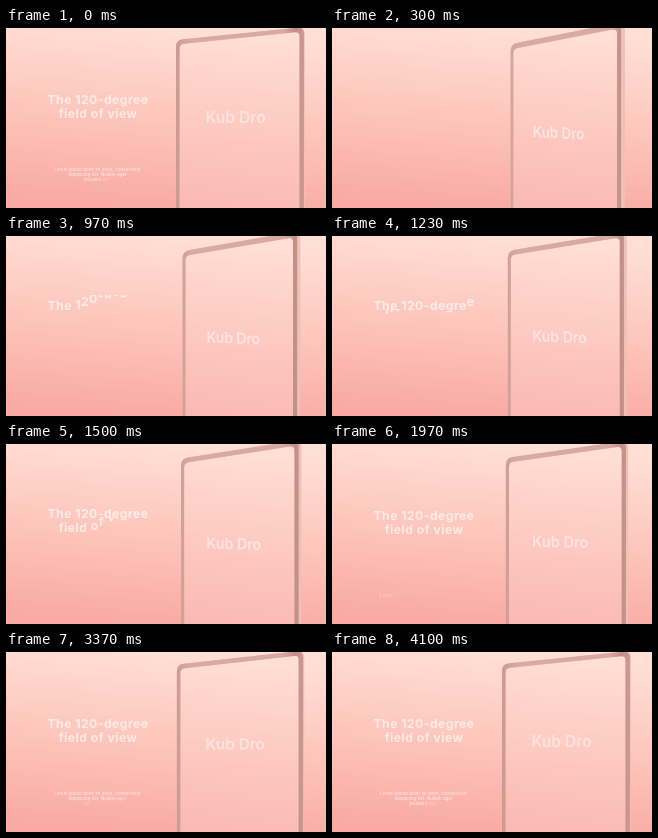
An HTML page that plays this animation: 320x180 px, repeating every 4.13 s.

```html
<!DOCTYPE html>
<html lang="en">
<head>
<meta charset="utf-8">
<title>Tablet turn</title>
<style>
  html, body { margin: 0; width: 100%; height: 100%; overflow: hidden; background: #fcc5bb; }
  svg { display: block; width: 100%; height: 100%; }
  text { font-family: Inter, "Open Sans", sans-serif; fill: #fff; text-anchor: middle; }
  #head text { font-size: 12.2px; font-weight: 700; letter-spacing: .45px; }
  #para text { font-size: 4.55px; font-weight: 400; }
  #name { font-size: 15.6px; font-weight: 600; }
</style>
</head>
<body>
<svg viewBox="0 0 320 180" preserveAspectRatio="none">
  <defs>
    <linearGradient id="sky" gradientUnits="userSpaceOnUse" x1="168" y1="0" x2="152" y2="180">
      <stop offset="0" stop-color="#ffdfd5"/>
      <stop offset=".5" stop-color="#fdc6bc"/>
      <stop offset="1" stop-color="#f9aaa4"/>
    </linearGradient>
    <linearGradient id="metal" gradientUnits="userSpaceOnUse" x1="170" y1="0" x2="298" y2="0">
      <stop offset="0" stop-color="#cc9a92"/>
      <stop offset=".12" stop-color="#d8aaa1"/>
      <stop offset=".84" stop-color="#d8a9a0"/>
      <stop offset=".93" stop-color="#c28f87"/>
      <stop offset="1" stop-color="#cc9a92"/>
    </linearGradient>
    <linearGradient id="glow" gradientUnits="userSpaceOnUse" x1="0" y1="20" x2="0" y2="180">
      <stop offset="0" stop-color="#fff" stop-opacity="0"/>
      <stop offset="1" stop-color="#fff" stop-opacity=".17"/>
    </linearGradient>
    <clipPath id="row0"><rect x="30" y="61" width="130" height="20"/></clipPath>
    <clipPath id="row1"><rect x="30" y="75" width="130" height="20"/></clipPath>
  </defs>
  <rect width="320" height="180" fill="url(#sky)"/>
  <path id="screen" fill="url(#glow)"/>
  <path id="side" fill="#eec1b7" fill-rule="evenodd"/>
  <path id="frame" fill="url(#metal)" fill-rule="evenodd"/>
  <text id="name">Kub Dro</text>
  <g id="head" opacity=".64">
    <g clip-path="url(#row0)"><text x="92" y="76">The 120-degree</text></g>
    <g clip-path="url(#row1)"><text x="92" y="90">field of view</text></g>
  </g>
  <g id="para" opacity=".75"></g>
</svg>
<script>
const LOOP = 4130, TURN = 4100;
const $ = id => document.getElementById(id);
const clamp = v => Math.min(1, Math.max(0, v));
const inOut = p => p < .5 ? 4 * p ** 3 : 1 - 4 * (1 - p) ** 3;

const headRows = [...document.querySelectorAll('#head text')];
const paraLines = ['Lorem ipsum dolor sit amet, consectetur', 'adipiscing elit. Nullam eget', 'posuere orci'];
const letters = [];

paraLines.forEach((line, row) => {
  const text = document.createElementNS('http://www.w3.org/2000/svg', 'text');
  text.setAttribute('x', 91.5);
  text.setAttribute('y', 142.5 + row * 5);
  for (const ch of line) {
    const span = document.createElementNS('http://www.w3.org/2000/svg', 'tspan');
    span.textContent = ch;
    text.append(span);
    letters.push(span);
  }
  $('para').append(text);
});

// Outline with rounded top corners, running off the bottom edge
function panel(x0, y0, x1, y1, r) {
  const k = (y1 - y0) / (x1 - x0);
  return `M${x0} 190V${y0 + r}Q${x0} ${y0} ${x0 + r} ${y0 + k * r}` +
    `L${x1 - r} ${y1 - k * r}Q${x1} ${y1} ${x1} ${y1 + r}V190Z`;
}

function drawTablet(t) {
  const u = clamp(1 - t / TURN), e = u ** 1.4;
  const left = 170 + 9.6 * e, right = 298 - 10 * e;
  const edge = right + .8 + 3.5 * e;
  const yl = 12 + 4.7 * e, yr = -1 - 5.6 * e;
  const screen = panel(left + 3.6 - e, 16.3 + 5 * e, right - 4.5 + .5 * e, 3.7 - 3.4 * e, 4.5);
  $('screen').setAttribute('d', screen);
  $('side').setAttribute('d', panel(left, yl, edge, yr, 7) + screen);
  $('frame').setAttribute('d', panel(left, yl, right, yr, 7) + screen);
  $('name').setAttribute('transform',
    `matrix(${1 - .16 * e} ${.045 * e} 0 1 ${229.5 - 3.3 * e} ${94.5 + 17 * u})`);
  $('name').setAttribute('fill-opacity', .45 + .1 * e);
}

// Each letter drops into its row, gaining speed until it lands
function drawHead(t) {
  let index = 0;
  for (const row of headRows) {
    let last = 0;
    const steps = [...row.textContent].map(() => {
      const p = clamp((t - 612 - 32 * index++) / 236) ** 2;
      const y = 15 * (p - 1), step = y - last;
      last = y;
      return step.toFixed(3);
    });
    index++;
    row.setAttribute('dy', steps.join(' '));
  }
  const lift = -2 * (1 - inOut(clamp((t - 1300) / 1100)));
  $('head').setAttribute('transform', `translate(0 ${lift})`);
  $('head').setAttribute('visibility', t < 550 ? 'hidden' : 'visible');
}

function drawPara(t) {
  const rest = 1 - clamp((t - 1850) / 2250);
  const shown = 80 * (1 - rest ** 1.83);
  letters.forEach((span, i) => span.setAttribute('fill-opacity', clamp((shown - i) / 8)));
  $('para').setAttribute('transform', `translate(0 ${12 * rest ** 3})`);
}

function draw(now) {
  let t = now % LOOP;
  if (t < 30) t += LOOP;
  drawTablet(t);
  drawHead(t);
  drawPara(t);
}

const origin = performance.now();
function tick() {
  draw(performance.now() - origin);
  requestAnimationFrame(tick);
}
tick();
</script>
</body>
</html>
```
